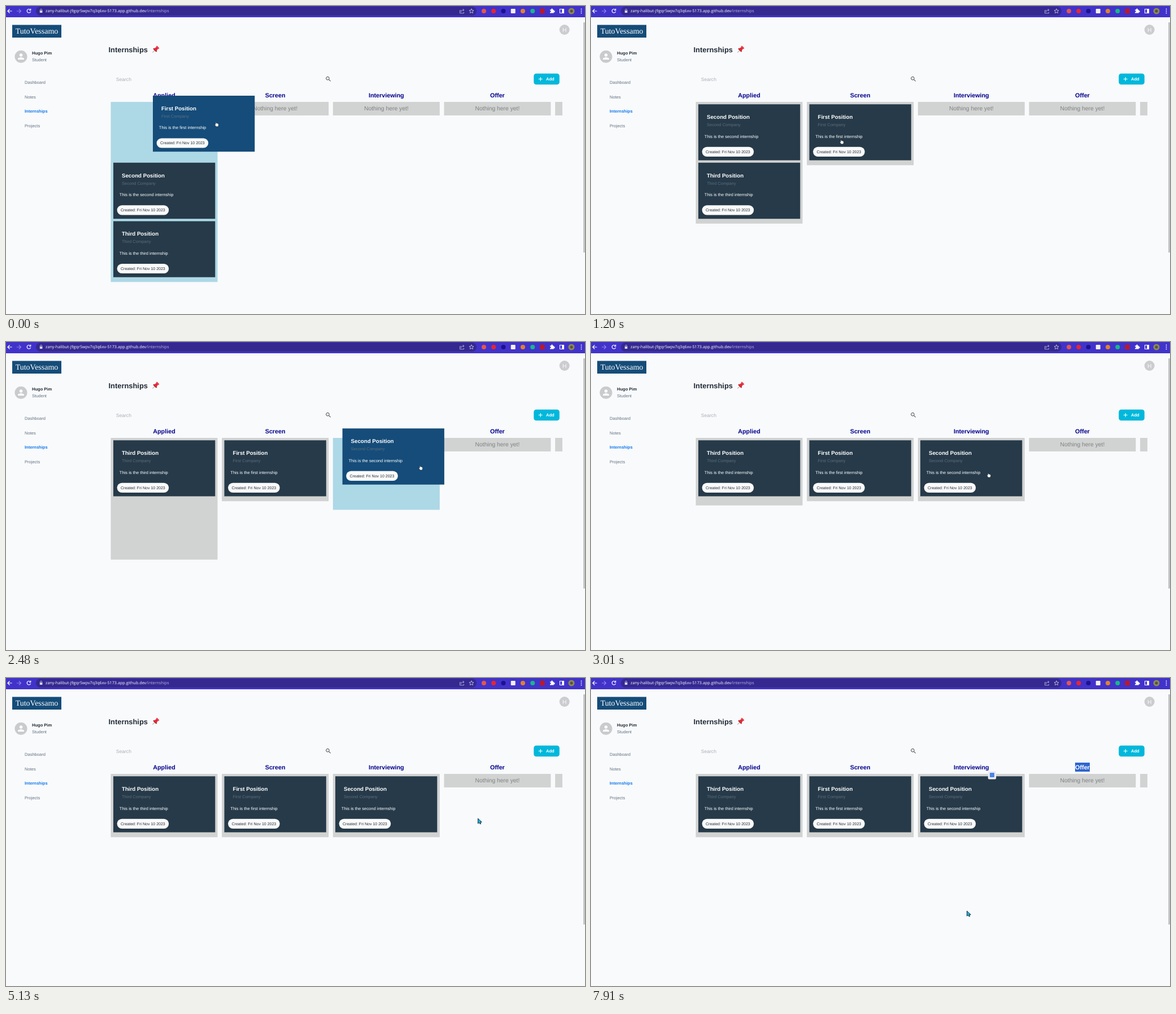
Write an HTML page with a canvas that moves like this. It is 1025 px wide and 546 px high and loops after 8000 ms.

```html
<!DOCTYPE html>
<html lang="en">
<head>
<meta charset="utf-8">
<title>Internships board</title>
<style>
html, body { margin: 0; width: 100%; height: 100%; overflow: hidden; background: #f9fafc; }
canvas { display: block; }
</style>
</head>
<body>
<canvas id="stage" width="1025" height="546"></canvas>
<script>
const ctx = document.getElementById('stage').getContext('2d');
const SANS = '"Liberation Sans", Arial, sans-serif';
const URL_FONT = '"Open Sans", "Noto Sans", sans-serif';
const LOOP = 8000, STEP = 130;       // the picture refreshes once per step
const TOP = 174.3, SLOT = 103.57;    // first card's place and the room each card takes
const DROP_1 = 7, GRAB_2 = 11, DROP_2 = 22, SELECT = 56;   // in steps

// Smooth 0..1 between two steps
function ease(n, from, to) {
  const p = Math.min(1, Math.max(0, (n - from) / (to - from)));
  return p * p * (3 - 2 * p);
}

const columnX = i => 185.5 + i * 196.65;

const places = {
  First(n) {
    const left = Math.max(0, 1 - n / 6);
    const pushed = ease(n, 13, 15) - ease(n, 15, 16.76);
    return [386.5 - 126.5 * left ** 1.5, TOP - 15.3 * left ** .6 + SLOT * pushed];
  },
  Second(n) {
    const landing = ease(n, 18, 21);
    return [190 + 410 * ease(n, GRAB_2, 17.72) - 17 * landing,
      TOP + SLOT * (1 - ease(n, 0, 3)) - 28.3 * (ease(n, GRAB_2, 16) - landing)];
  },
  Third: n => [190, TOP + SLOT * (2 - ease(n, 0, 3) - ease(n, 12, 16.6))]
};

function columnHeights(n) {
  const empty = 24, spare = 15.4;
  return [
    8.6 + SLOT * (3 - ease(n, 6, 9) - ease(n, 21, 23.4)),
    empty + SLOT * (ease(n, 0, 3) + ease(n, 13, 15) - ease(n, 15, 16.6)) - (n < DROP_1 ? 0 : spare),
    empty + SLOT * ease(n, 14, 16) - (n < DROP_2 ? 0 : spare),
    empty
  ];
}

// Pointer stops: step, x, y
const stops = [
  [0, 373, 210], [3, 438, 225], [6, 444, 241], [9, 444, 241], [11, 339, 242], [13, 420, 222],
  [16, 682, 214], [18, 742, 220], [22, 711, 233], [25, 691, 243], [31, 685, 249], [34, 683, 240],
  [35, 838, 254], [39, 838, 254], [42, 789, 242], [46, 716, 231], [48, 692, 213], [51, 731, 213],
  [52, 797, 217], [55, 787, 218], [57, 710, 215], [58, 761, 255], [60, 668, 418]
];

function pointer(n) {
  const i = stops.findIndex(s => s[0] > n);
  if (i < 0) return stops.at(-1).slice(1);
  const [n0, x0, y0] = stops[i - 1], [n1, x1, y1] = stops[i];
  const p = (n - n0) / (n1 - n0);
  return [x0 + (x1 - x0) * p, y0 + (y1 - y0) * p];
}

function rect(x, y, w, h, color, r = 0) {
  ctx.fillStyle = color;
  ctx.beginPath();
  ctx.roundRect(x, y, w, h, r);
  ctx.fill();
}

const dot = (x, y, r, color) => rect(x - r, y - r, 2 * r, 2 * r, color, r);

function text(s, x, y, size, color, weight = 400, align = 'left', family = SANS) {
  ctx.font = `${weight} ${size}px ${family}`;
  ctx.fillStyle = color;
  ctx.textAlign = align;
  ctx.fillText(s, x, y);
  return ctx.measureText(s).width;
}

function shape(d, x, y, scale, fill, stroke, width = 1) {
  const path = new Path2D(d);
  ctx.save();
  ctx.translate(x, y);
  ctx.scale(scale, scale);
  if (fill) { ctx.fillStyle = fill; ctx.fill(path, 'evenodd'); }
  if (stroke) { ctx.strokeStyle = stroke; ctx.lineWidth = width; ctx.stroke(path); }
  ctx.restore();
}

function browserBar() {
  rect(0, 0, 1025, 20, '#4133ca');
  rect(53, 1, 780, 16, '#35298f', 8);
  shape('M9 4H2M5 .5 1.5 4 5 7.5', 1.5, 5, 1, null, '#fff', 1.2);
  shape('M0 4H7M4 .5 7.5 4 4 7.5', 19, 5, 1, null, '#8f86e0', 1.1);
  shape('M6.3 1.7A3.3 3.3 0 1 0 7.2 5M7.2 0V2.8H4.4', 36.5, 4.7, 1, null, '#fff', 1.2);
  rect(59.8, 8, 4.6, 4, '#d5d2ee', .5);
  shape('M0 3V1.5A1.5 1.5 0 0 1 3 1.5V3', 60.6, 5.4, 1, null, '#d5d2ee', .8);
  const w = text('zany-halibut-j9gqr5wpv7q3q6xv-5173.app.github.dev', 70, 11.4, 7.22, '#fff', 400, 'left', URL_FONT);
  text('/internships', 70 + w, 11.4, 7.22, '#bbb6e2', 400, 'left', URL_FONT);
  shape('M2 3H0V8H7V6M2 6C2 3 4 2.3 7 2.3M5.3 .3 7.5 2.3 5.3 4.3', 803.5, 4.8, 1, null, '#c9c5ea', .8);
  shape('M4 0 5.1 2.8 8 3 5.8 4.9 6.5 7.8 4 6.2 1.5 7.8 2.2 4.9 0 3 2.9 2.8Z', 820, 4.8, 1, null, '#d5d2ee', .8);
  ['#e4574a', '#e8262d', '#1b1290', '#f4efe9', '#e2812b', '#16b888', '#c5161d'].forEach((color, i) =>
    rect(842 + i * 17.25, 5, 8, 8, color, i === 3 || i === 6 ? 1 : 4));
  shape('M0 2H2.4A1.4 1.4 0 1 1 5 2H7V4A1.5 1.5 0 1 1 7 6.8V8.5H0V6.3A1.3 1.3 0 1 0 0 4Z', 963, 4.5, .95, '#fff');
  shape('M0 0H7V7H0Z', 980.5, 5.5, 1, null, '#fff', 1.1);
  rect(984.2, 5.5, 3.3, 7, '#fff');
  dot(1001, 9, 5.5, '#8d8a58');
  dot(1001, 9, 2.5, '#55543c');
  [5.5, 9, 12.5].forEach(y => dot(1018.5, y, .9, '#fff'));
}

function pin() {
  ctx.save();
  ctx.translate(265, 76.9);
  ctx.rotate(Math.PI / 4);
  ctx.scale(.88, .88);
  rect(-.5, 1, 1, 8, '#8b98a3');
  rect(-4.7, .2, 9.4, 3, '#c9252f', 1.5);
  shape('M-2.3-5H2.3L3.4 1.6H-3.4Z', 0, 0, 1, '#dd2e3b');
  rect(-3.7, -7, 7.4, 2.6, '#ee3d48', 1.2);
  ctx.restore();
}

function page() {
  rect(0, 0, 1025, 546, '#f9fafc');
  browserBar();
  rect(1022, 29, 3, 408, '#c4c5c7');
  rect(11, 33.5, 87, 22.5, '#154c79');
  text('TutoVessamo', 54.5, 49, 14, '#fff', 400, 'center', '"Liberation Serif", "Times New Roman", serif');

  dot(26.5, 89.7, 11, '#c9cbcd');
  shape('M12 12a4 4 0 1 0 0-8 4 4 0 0 0 0 8zm0 2c-2.7 0-8 1.3-8 4v2h16v-2c0-2.7-5.3-4-8-4z', 18.4, 81.5, .68, '#fff');
  text('Hugo Pim', 46, 86.4, 7.54, '#212b36', 700);
  text('Student', 46, 98.3, 7.54, '#637381');
  ['Dashboard', 'Notes', 'Internships', 'Projects'].forEach((s, i) => {
    const on = i === 2;
    text(s, 33, 137.6 + i * 25.9, 7.54, on ? '#0f78ec' : '#637381', on ? 700 : 400);
  });
  dot(988.7, 42, 9, '#cbcdcf');
  text('H', 988.7, 45.7, 10.2, '#f9fafc', 400, 'center');

  text('Internships', 181.5, 82, 12.9, '#212b36', 700);
  pin();
  text('Search', 194.7, 132.8, 8.6, '#aab0b6');
  shape('M15.5 14h-.8l-.3-.3a6.5 6.5 0 1 0-.7.7l.3.3v.8l5 5 1.5-1.5zM9.5 14a4.5 4.5 0 1 1 0-9 4.5 4.5 0 0 1 0 9z', 564.7, 123.5, .5, '#4a4f55');
  rect(934.3, 119.8, 45.5, 19.5, '#00b8db', 4.3);
  shape('M0 3.5H7M3.5 0V7', 942.7, 126, 1, null, '#fff', 1.1);
  text('Add', 956, 132.2, 7.6, '#fff', 700);
}

function hoveredColumn(n) {
  if (n >= DROP_1 && n < GRAB_2 || n >= DROP_2) return -1;
  if (n < DROP_1) return n < 1 ? 0 : 1;
  return n < 14 ? 0 : n < 15 ? 1 : 2;
}

function columns(n) {
  const hovered = hoveredColumn(n), heights = columnHeights(n);
  const isEmpty = [false, n < DROP_1, n < DROP_2, true];
  ['Applied', 'Screen', 'Interviewing', 'Offer'].forEach((name, i) => {
    const x = columnX(i), mid = x + 94.5, selected = i === 3 && n >= SELECT;
    if (selected) rect(857, 150, 26, 16, '#2f65cf');
    text(name, mid, 161.8, 10.75, selected ? '#fff' : '#00008b', 700, 'center');
    rect(x, 170, 189, heights[i], hovered === i ? '#add8e6' : '#d1d2d2');
    if (isEmpty[i]) text('Nothing here yet!', mid, 185.3, 10.35, '#808182', 400, 'center');
  });
  rect(columnX(4), 170, 985 - columnX(4), 24, '#d1d2d2');
}

function card(word, n, held) {
  const [x, y] = places[word](n);
  rect(x, y, 180.3, 99.3, held ? '#154c79' : '#263a49');
  text(word + ' Position', x + 15, y + 26, 9.7, '#fff', 700);
  text(word + ' Company', x + 15, y + 38.9, 7.54, '#5d6d7a');
  text(`This is the ${word.toLowerCase()} internship`, x + 10.8, y + 59.3, 7.56, '#fff');
  rect(x + 6.6, y + 75.5, 91.6, 17.1, '#fafafa', 8.55);
  text('Created: Fri Nov 10 2023', x + 13, y + 86.4, 7.02, '#212b36');
}

function cursor(n) {
  const [x, y] = pointer(n);
  const overCard = x < 764 && y < 276;
  if (overCard) {
    shape('M-2.2 0V-3.2Q-1.4-4.4-.6-3.2V-2.2Q.2-3 1-2 1.9-2.5 2.5-1.5 3.6-1.6 3.6-.4V1.4Q3.4 3 2.4 4.2H-1.2Q-2.6 2.4-3.8.6-3.6-.8-2.2 0Z',
      x, y, .9, '#fff', '#18242c', .6);
  } else {
    shape('M0 0V9L2.3 7.2 3.8 10 5.4 9.2 4 6.5H6.8Z', x - 2.5, y - 5, 1, '#19b5e6', '#10202c', .9);
  }
}

function draw(time) {
  const n = Math.floor(time % LOOP / STEP);
  const held = n < DROP_1 ? 'First' : n >= GRAB_2 && n < DROP_2 ? 'Second' : '';
  page();
  columns(n);
  Object.keys(places).filter(w => w !== held).forEach(w => card(w, n, false));
  if (held) card(held, n, true);
  if (n > SELECT) {
    rect(702.8, 165, 14.4, 14.4, '#e9ebee', 2);
    rect(706, 168, 8, 8, '#4a83e6', 1);
  }
  cursor(n);
}

ctx.textRendering = 'geometricPrecision';
let start;
function frame(now) {
  start ??= now;
  draw(now - start);
  requestAnimationFrame(frame);
}
requestAnimationFrame(frame);
</script>
</body>
</html>
```
